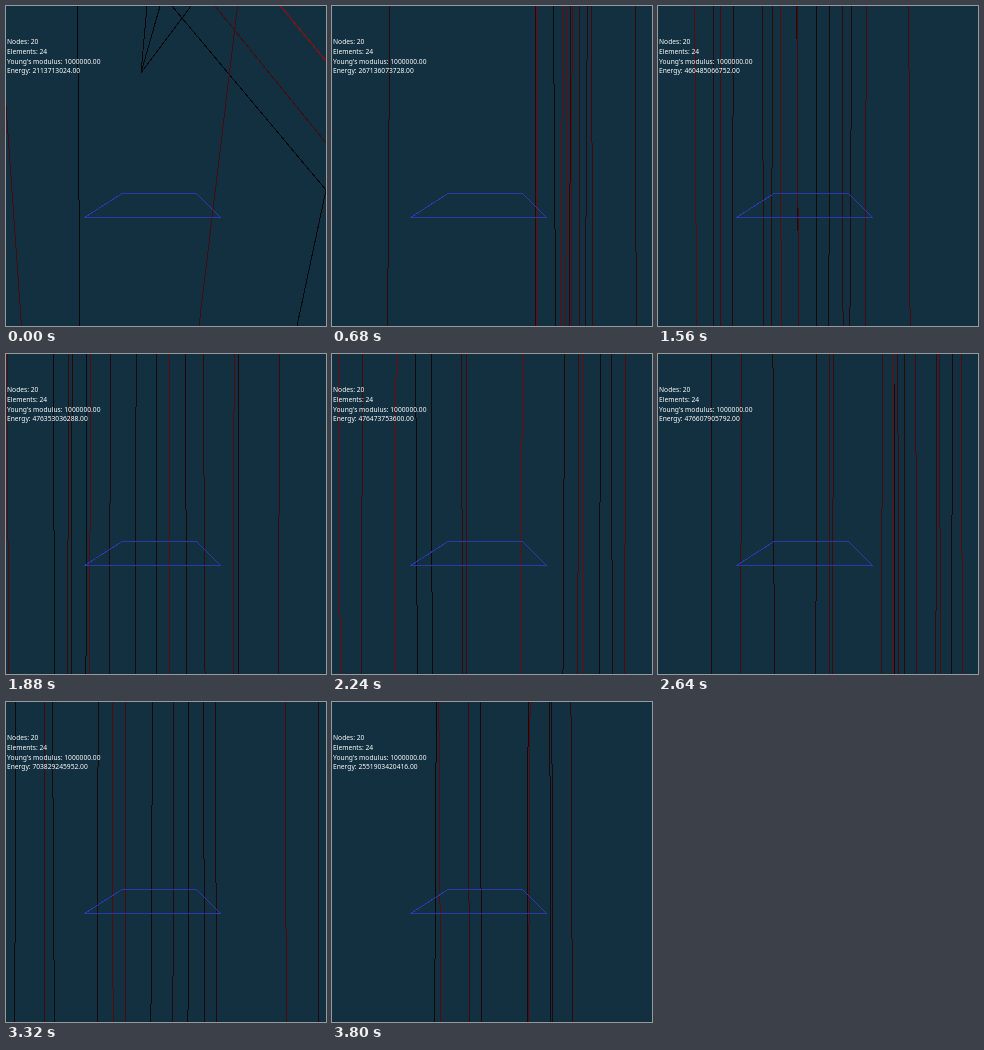
An HTML page for the animation above (3.84 s loop, 320x320 px).

```html
<!DOCTYPE html>
<html lang="en">
<head>
<meta charset="utf-8">
<title>Unstable truss</title>
<style>
  html, body { margin: 0; width: 100%; height: 100%; overflow: hidden; background: #123040; }
  svg { display: block; width: 100vw; height: 100vh; }
  path, line { fill: none; stroke-width: 1; shape-rendering: crispEdges; }
  text { font: 500 6.7px "Noto Sans", "Open Sans", sans-serif; fill: #fff; }
</style>
</head>
<body>
<svg viewBox="0 0 320 320">
  <g id="rest">
    <path stroke="#06080c" d="M71.5 0L74 320M166 0L320 184L291 320M141 0L135 67L154 0M135 67L185 0"/>
    <path stroke="#430b12" d="M-7 0L15.5 320M231.5 0L193 320M209 0L320 137"/>
    <path stroke="#a00808" d="M274.5 0L320 55"/>
  </g>
  <g id="bars"></g>
  <path stroke="#2a3aae" d="M116 187.5H190.5L214.5 211.5H78.5Z"/>
  <text x="1" y="38.4">Nodes: 20</text>
  <text x="1" y="48">Elements: 24</text>
  <text x="1" y="58.4">Young's modulus: 1000000.00</text>
  <text x="1" y="67.4">Energy: <tspan id="energy"></tspan></text>
</svg>
<script>
const STEP = 40, STEPS = 96, MAX_BARS = 19;
const rest = document.getElementById('rest');
const barGroup = document.getElementById('bars');
const energyText = document.getElementById('energy');

const bars = Array.from({ length: MAX_BARS }, () =>
  barGroup.appendChild(document.createElementNS('http://www.w3.org/2000/svg', 'line')));

// Energy at a few steps; it grows exponentially in between
const energyKeys = [
  [0, 2113713024], [17, 267136073728], [30, 443264565248], [47, 476353036288],
  [66, 476607905792], [83, 703829245952], [95, 2551903420416]
];

function energyAt(step) {
  const next = energyKeys.findIndex(([s]) => s >= step);
  const [s1, e1] = energyKeys[next];
  if (s1 === step) return e1;
  const [s0, e0] = energyKeys[next - 1];
  return Math.fround(e0 * (e1 / e0) ** ((step - s0) / (s1 - s0)));
}

function seeded(seed) {
  let s = seed * 7919 + 17;
  const next = () => {
    s = (s * 16807) % 2147483647;
    return s / 2147483647;
  };
  next();
  next();
  return next;
}

// The solver diverges: nodes are thrown far off stage, so bars jump on
// every step, turn upright, and leave the view towards the end
function drawBars(step) {
  const rnd = seeded(step + 1);
  const t = step / (STEPS - 1);
  const count = Math.round(MAX_BARS - 9 * t ** 6);
  const tilt = 2 + 160 * Math.exp(-step / 3);
  bars.forEach((bar, i) => {
    const x = 180 + (rnd() + rnd() + rnd() - 1.5) * (260 - 120 * t ** 6);
    const lean = (rnd() - 0.5) * tilt;
    const strain = rnd() ** 1.5;
    bar.setAttribute('x1', x - lean);
    bar.setAttribute('y1', 0);
    bar.setAttribute('x2', x + lean);
    bar.setAttribute('y2', 320);
    bar.setAttribute('stroke', `rgb(${12 + 110 * strain}, 9, 12)`);
    bar.style.display = i < count ? '' : 'none';
  });
}

function draw(step) {
  rest.style.display = step ? 'none' : '';
  barGroup.style.display = step ? '' : 'none';
  if (step) drawBars(step);
  energyText.textContent = energyAt(step).toFixed(2);
}

let shown = -1;
function tick() {
  const step = Math.floor(performance.now() / STEP) % STEPS;
  if (step !== shown) draw(shown = step);
  requestAnimationFrame(tick);
}
tick();
</script>
</body>
</html>
```
